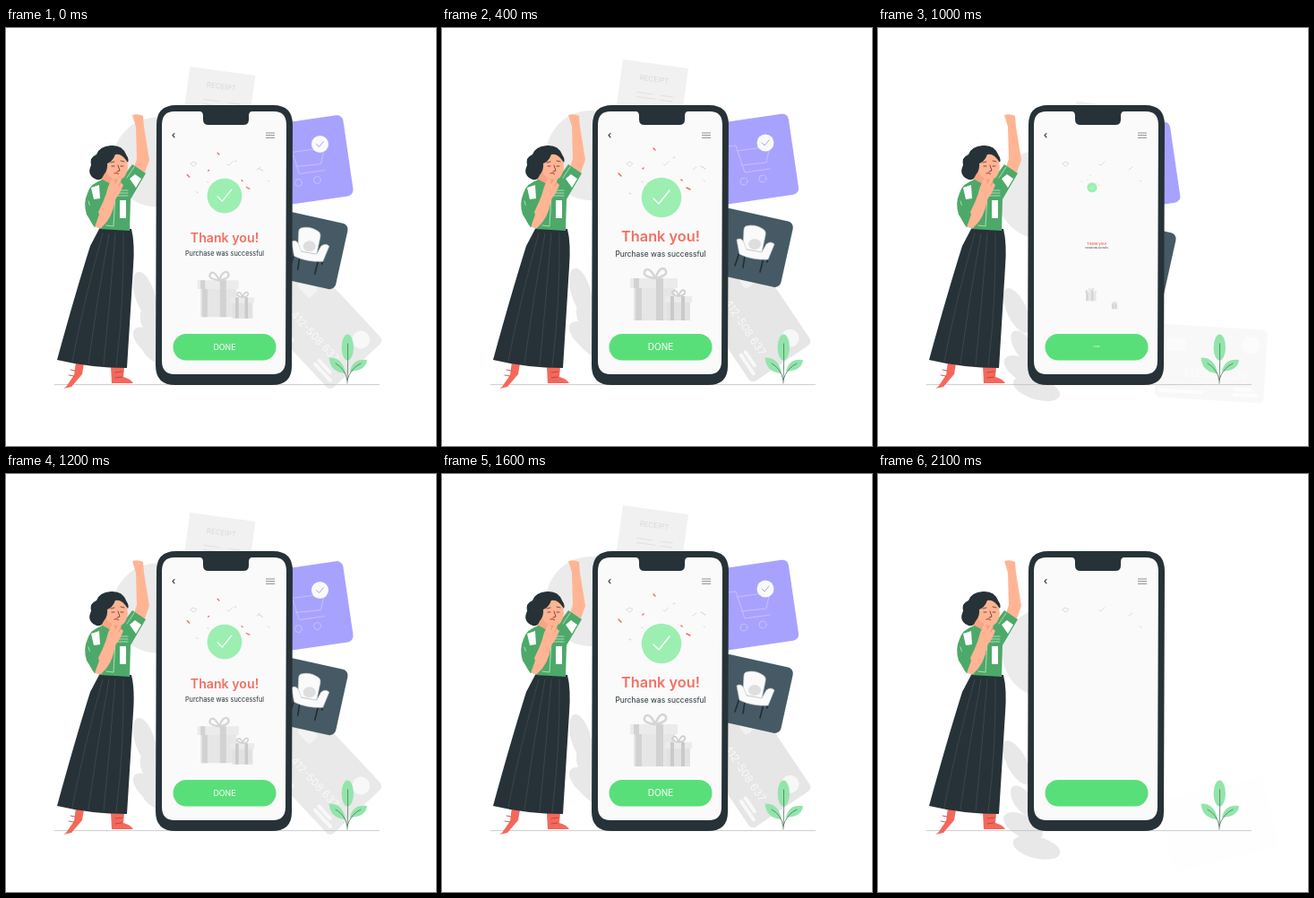
Animation, 480 px wide and 466 px high, one loop 2200 ms. Source, as an HTML page:

```html
<!DOCTYPE html>
<html lang="en">
<head>
<meta charset="utf-8">
<title>Purchase complete</title>
<style>
  html, body { margin: 0; width: 100%; height: 100%; overflow: hidden; background: #fff; }
  svg { display: block; width: 100%; height: 100%; }
  text { font-family: Inter, "Open Sans", sans-serif; text-anchor: middle; }
  .line { fill: none; stroke-linecap: round; stroke-linejoin: round; }
</style>
</head>
<body>
<svg viewBox="0 0 480 466">
  <rect width="480" height="466" fill="#fff"/>

  <!-- Items that slide out from behind the phone -->
  <g fill="#ebebeb">
    <circle id="blob" cx="166" cy="142" r="50"/>
    <g id="foliage" fill="#e8e8e8"></g>
  </g>
  <g id="receipt">
    <path d="M202 35L275 45 264 125 191 115Z" fill="#f1f1f1"/>
    <g transform="translate(237 57) rotate(8)">
      <text y="3" font-size="8" fill="#d8d8d8">RECEIPT</text>
      <path d="M-17 17H0M10 17h13M-17 22H4M10 22h13" class="line" stroke="#e0e0e0"/>
    </g>
  </g>
  <g id="bankCard">
    <rect x="-61" y="-41" width="122" height="82" rx="6" fill="#e6e6e6"/>
    <path d="M-55 33H-9M28 33H53M28 27H46" class="line" stroke="#f8f8f8" stroke-width="4"/>
    <text x="5" y="16" font-size="12" fill="#f8f8f8">412-508 637</text>
    <circle cx="43" cy="-23" r="10" fill="#f7f7f7"/>
    <rect x="-50" y="-26" width="20" height="14" rx="3" fill="#f2f2f2"/>
  </g>
  <g id="chairCard">
    <rect x="-40" y="-37.5" width="80" height="75" rx="7" transform="translate(346 245) rotate(12.5)" fill="#455a64"/>
    <path d="M332 250l-5 15M338 254l-2 13M359 256l-4 16M364 251l-1 10" class="line" stroke="#222d33" stroke-width="1.6"/>
    <g fill="#fafafa" stroke="#c9cdd0" stroke-width=".7" stroke-linejoin="round">
      <path d="M339 221Q349 218 358 224Q362 226 361 231L357 250 336 246 337 225Q337 222 339 221Z"/>
      <path d="M329 236Q334 233 337 239L340 247 357 250 362 241Q367 237 371 241L364 258Q346 259 332 252Z"/>
    </g>
    <ellipse cx="349" cy="241" rx="7" ry="6" fill="#dedede"/>
  </g>
  <g id="cartCard">
    <rect x="-50" y="-45.5" width="100" height="91" rx="7" transform="translate(343 147) rotate(-8.3)" fill="#a8a2ff"/>
    <g class="line" stroke="#c5c0ff">
      <path d="M320 132L328 131 338 161 366 157M329 137L366 132 362 150 334 153"/>
      <circle cx="337" cy="171" r="4"/><circle cx="358" cy="168" r="4"/>
    </g>
    <circle cx="361" cy="128" r="9.5" fill="#fafafa"/>
    <path d="M357 128l3 3 5-6" class="line" stroke="#a8a2ff"/>
  </g>

  <path d="M54 397.6H417" stroke="#bdc1c3" stroke-width=".8"/>

  <!-- Phone -->
  <path d="M190 86H298Q320 86 320 108L319 377Q319 398 297 398H189Q167 398 167 376L168 108Q168 86 190 86Z" fill="#263238"/>
  <path d="M188 93H216Q220 93 220 98V102Q220 108 226 108H265Q271 108 271 102V98Q271 93 275 93H299Q313 93 313 108L312 371Q312 386 298 386H188Q174 386 174 371V108Q174 93 188 93Z" fill="#fafafa"/>
  <path d="M188 117.5l-2 2.2 2 2.2" class="line" stroke="#263238" stroke-width="1.1"/>
  <path d="M290 117h10M290 119.7h10M290 122.4h10" stroke="#7d8488" stroke-width=".9"/>
  <g class="line" stroke="#dcdcdc">
    <path d="M206 151l3-2 4 2-3 3zM247 152l2 1 4-4M280 158l4-3M292 170l2 1"/>
  </g>
  <rect x="186.5" y="341" width="115" height="29.5" rx="14.7" fill="#59df79"/>

  <!-- Screen content -->
  <g id="success">
    <circle cx="245" cy="189" r="22.3" fill="#9cefb1"/>
    <path d="M236 190l6 6 12-15" class="line" stroke="#fff" stroke-width="1.5"/>
    <g class="line" stroke="#f46a5d" stroke-width="1.5">
      <path d="M197 162l3 3M273 178l4 2M236 134l2 2M267 169l1 1M224 157l1-1"/>
    </g>
    <path d="M209 184l2 1M289 154l5 3M258 145l2-1M223 171l1 1" class="line" stroke="#d9d9d9" stroke-width="1.2"/>
  </g>
  <g id="message">
    <text x="244" y="238" font-size="16.3" font-weight="600" fill="#f46f62">Thank you!</text>
    <text x="244" y="255.4" font-size="8.45" fill="#263238">Purchase was successful</text>
  </g>
  <g id="bigGift">
    <path d="M214 289H260V326H214Z" fill="#e6e6e6"/>
    <path d="M210 279H263V290H210Z" fill="#ebebeb"/>
    <path d="M216 290H223V326H216ZM239 279H247V326H239ZM214 279H220V290H214Z" fill="#d2d2d2"/>
    <path d="M238 279Q222 277 227 270Q232 266 238 279Q243 265 249 269Q254 276 238 279" class="line" stroke="#d5d5d5" stroke-width="2.5"/>
  </g>
  <g id="smallGift">
    <path d="M251 305H277V326H251Z" fill="#e2e2e2"/>
    <path d="M249 299H279V306H249Z" fill="#ebebeb"/>
    <path d="M255 299H259V326H255ZM267 299H271V326H267Z" fill="#cacaca"/>
    <path d="M264 299Q254 297 258 293Q262 291 264 299Q267 290 271 293Q273 298 264 299" class="line" stroke="#cfcfcf" stroke-width="1.7"/>
  </g>
  <text id="done" x="244" y="359.2" font-size="10.1" fill="#fff">DONE</text>

  <!-- Potted sprig -->
  <g>
    <g fill="#92e5aa">
      <ellipse cx="381.3" cy="356" rx="6.7" ry="14.5"/>
      <path d="M379 385Q362 384 360.500 367.500Q376 367 379 385Z"/>
      <path d="M384 383Q387 368 403 370Q402 382 384 383Z"/>
    </g>
    <path d="M381 396Q382 372 381.500 352M381 393Q379 380 368 374M381 392Q385 379 396 374" class="line" stroke="#52745f" stroke-width=".8"/>
  </g>

  <!-- Woman -->
  <g>
    <path d="M78 372L76 387 67 400 64 402 73 400 85 386 87 374ZM117 377L118 396H142Q139 391 131 389L132 378Z" fill="#f4685b"/>
    <path d="M72 381l5 1M70 387l6 1M122 384l8-1M122 390l7-1" class="line" stroke="#a9433c" stroke-width=".8"/>
    <path d="M104 224H140Q144 240 142 266L135 379Q95 379 57 370Q77 297 94 243Z" fill="#263238"/>
    <path d="M108 229Q88 300 74 371M115 229Q102 300 92 374M122 229Q116 305 109 376M131 229Q132 305 123 377" class="line" stroke="#49555b" stroke-width=".6"/>
    <path d="M141 97Q147 95 153 98L154 110 160 147 155 161 143 155 146 146 145 110Z" fill="#ffb594"/>
    <path d="M108 158H128L130 176H105Z" fill="#f6a586"/>
    <path d="M108 169Q94 173 91 184Q86 195 90 208L99 222 106 217 104 224 138 226 139 191 156 162 141 152 129 168 119 175Z" fill="#4da969"/>
    <g fill="#fff">
      <path d="M95 178L104 175 105 190 98 191ZM127 192H134V212H127ZM138 168l6-5 7 5-6 10Z"/>
    </g>
    <path d="M92 193l7 22M122 187L120 221 112 220M124 181h12M124 184h12M124 187h12M135 167l8-12" class="line" stroke="#b7e0c2" stroke-width=".9"/>
    <path d="M113 139Q110 152 112 161Q118 170 128 169Q134 167 136 156L134 140 124 134Z" fill="#ffb594"/>
    <path d="M134 141Q130 130 117 131Q104 132 101 141Q93 144 95 153Q90 163 99 168Q106 172 109 164Q114 158 113 151Q119 149 122 141Q129 139 136 150Q138 147 134 141Z" fill="#263238"/>
    <path d="M117 150l4-1M128 148l4 1M118 154h3M128 154h3M125 153l2 6-3 1" class="line" stroke="#6c3e37" stroke-width=".9"/>
    <path d="M121 162q3-1 5 1" class="line" stroke="#c94c46" stroke-width="1.3"/>
    <path d="M97 216Q110 194 114 177L119 166 122 172 127 160 130 163 128 172 131 175 127 184 122 191Q119 212 106 223Q99 224 97 216Z" fill="#ffb594"/>
    <path d="M122 173l2-4M126 176l2-4" class="line" stroke="#d98568" stroke-width=".7"/>
    <path d="M90 203Q94 217 99 222L104 208 98 191Z" fill="#4da969"/>
  </g>
</svg>
<script>
const STEP = 100, LOOP = 2200;
// How far everything has popped out, per step of one pulse
const PULSE = [.87, .95, .985, 1, 1, .98, .93, .83, .54, .01, .25, .65];
const byId = id => document.getElementById(id);

const POPS = { success: [237, 174], message: [244, 243], bigGift: [238, 297],
  smallGift: [264, 309], done: [244, 355.5] };
const SLIDES = { cartCard: [-81, 12], chairCard: [-79, 17], receipt: [26, 62], blob: [23, 58] };

// Leaves at rest behind the phone: x, y, rx, ry, angle, drop
const LEAVES = [
  [155, 322, 11, 27, -28, 28],
  [162, 365, 10, 20, -35, 40],
  [162, 393, 12, 24, -62, 48],
  [177, 417, 12, 27, -76, 60]
];
const leaves = LEAVES.map(([, , rx, ry]) => {
  const leaf = document.createElementNS("http://www.w3.org/2000/svg", "ellipse");
  leaf.setAttribute("rx", rx);
  leaf.setAttribute("ry", ry);
  return byId("foliage").appendChild(leaf);
});

const move = (el, value) => el.setAttribute("transform", value);

function draw(time) {
  const step = Math.floor((time % LOOP) / STEP);
  const shown = PULSE[step % PULSE.length], hidden = 1 - shown;

  for (const [id, [x, y]] of Object.entries(POPS))
    move(byId(id), `translate(${x * hidden} ${y * hidden}) scale(${shown})`);

  for (const [id, [dx, dy]] of Object.entries(SLIDES))
    move(byId(id), `translate(${dx * hidden} ${dy * hidden})`);

  LEAVES.forEach(([x, y, , , angle, drop], i) =>
    move(leaves[i], `translate(${x} ${y - drop * shown}) rotate(${angle + 12 * shown})`));

  const card = byId("bankCard");
  move(card, `translate(${345.5 + 35 * hidden} ${323 + 68 * hidden}) rotate(${56 - 70 * hidden})`);
  card.setAttribute("opacity", shown);
}

const start = performance.now();
function tick() {
  draw(performance.now() - start);
  requestAnimationFrame(tick);
}
tick();
</script>
</body>
</html>
```
